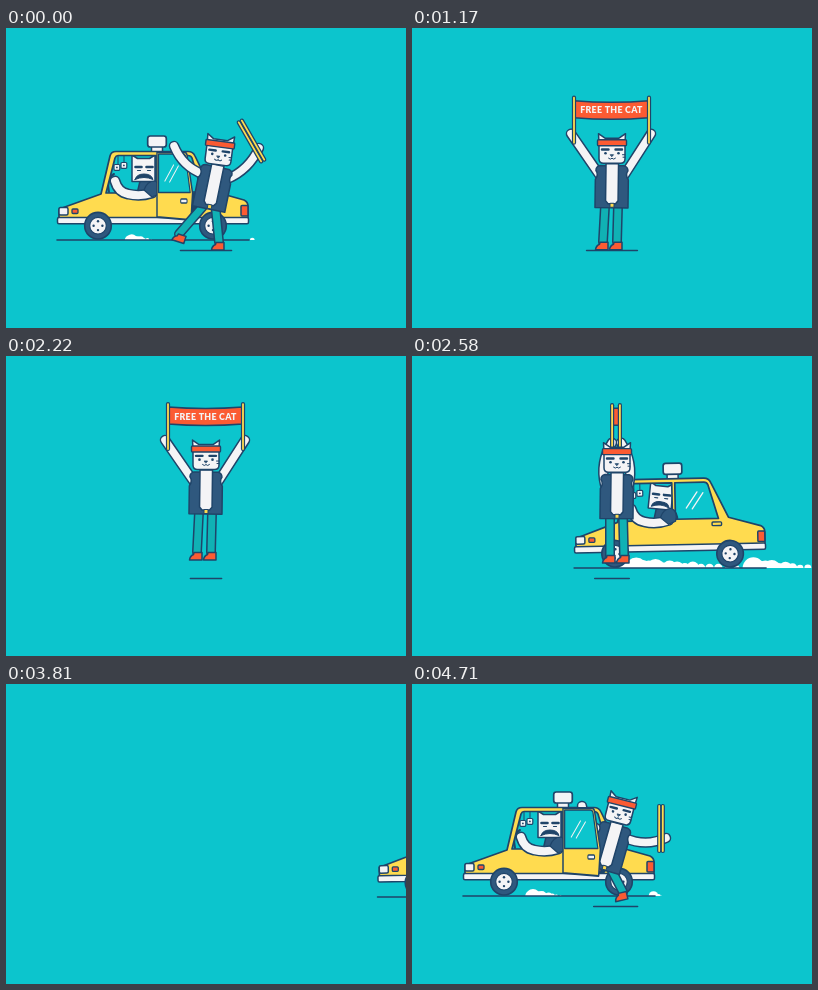
An HTML page with a canvas for the animation above (4770 ms loop, 400 px wide and 300 px high).

```html
<!DOCTYPE html>
<html lang="en">
<head>
<meta charset="utf-8">
<title>Free the cat</title>
<style>
html, body { margin: 0; height: 100%; overflow: hidden; background: #0cc5cd; }
canvas { display: block; width: 100vw; height: 100vh; }
</style>
</head>
<body>
<canvas id="stage"></canvas>
<script>
const LOOP = 4770, TEAL = '#0cc5cd', LINE = '#1f4469', VEST = '#2f587e', WHITE = '#f4f4f6',
  YELLOW = '#ffdb4f', ORANGE = '#fb5b33', PANTS = '#10b1b4';
const canvas = document.getElementById('stage'), g = canvas.getContext('2d');
const ratio = window.devicePixelRatio || 1;
canvas.width = 400 * ratio;
canvas.height = 300 * ratio;

const clamp = (v, lo = 0, hi = 1) => Math.max(lo, Math.min(hi, v));
const smooth = v => v * v * (3 - 2 * v);
const ramp = (t, a, b) => smooth(clamp((t - a) / (b - a)));
const mix = (a, b, k) => a + (b - a) * k;

function paint(path, fill, width = 1.5, rule = 'nonzero') {
  const p = typeof path === 'string' ? new Path2D(path) : path;
  if (fill) { g.fillStyle = fill; g.fill(p, rule); }
  if (width) { g.strokeStyle = LINE; g.lineWidth = width; g.stroke(p); }
}
function box(x, y, w, h, r, fill, width) {
  const p = new Path2D();
  p.roundRect(x, y, w, h, r);
  paint(p, fill, width);
}
function disc(x, y, r, fill, width = 0) {
  const p = new Path2D();
  p.arc(x, y, r, 0, 7);
  paint(p, fill, width);
}
function limb(path, width, color, edge = 3) {
  const p = new Path2D(path);
  for (const [w, c] of [[width + edge, LINE], [width, color]]) {
    g.lineWidth = w;
    g.strokeStyle = c;
    g.stroke(p);
  }
}
function within(x, y, angle, draw) {
  g.save();
  g.translate(x, y);
  g.rotate(angle);
  draw();
  g.restore();
}

// Value of a keyed track at time t; keys are [time, number or array]
function track(keys, t) {
  let i = 0;
  while (i < keys.length - 2 && t >= keys[i + 1][0]) i++;
  const [t0, a] = keys[i], [t1, b] = keys[i + 1], k = ramp(t, t0, t1);
  return Array.isArray(a) ? a.map((v, n) => mix(v, b[n], k)) : mix(a, b, k);
}

// Car
const arrive = (t, stop, rate) => ((stop - Math.min(t, stop)) * rate) ** 2;
const leave = (t, start) => -258 * (Math.max(0, t - start) / 450) ** 2;
function carOffset(t) {
  if (t < 570) return leave(t, 60);
  if (t < 2300) return null;
  if (t < 3290) return arrive(t, 2921, .031);
  if (t < 3780) return leave(t, 3290);
  return arrive(t, 4455, .0278);
}
const doorKeys = [[0, .79], [90, 1], [2800, 1], [2920, .55], [3070, .55], [3200, 1],
  [4420, 1], [4520, .55], [4610, .6], [4710, .83], [LOOP, .79]];

// Half-round puffs trailing each wheel, dying down after the stop
function dust(t, stop, rate) {
  const now = arrive(t, stop, rate);
  g.fillStyle = '#fff';
  for (const [wheel, life] of [[98, 540], [221, 350]]) {
    for (let k = 0; k < 30; k++) {
      const born = stop - 870 + k * 30, age = t - born;
      if (age < 0 || age > life) continue;
      const x = wheel + mix(now, arrive(born, stop, rate), .15) + .08 * age;
      const r = (10 + 2 * Math.sin(k * 2.4 + wheel)) * clamp(age / 40) * (1 - age / life) ** .7;
      g.beginPath();
      g.arc(x, 212, r, Math.PI, 2 * Math.PI);
      g.fill();
    }
  }
}

function glare(x) {
  g.strokeStyle = WHITE;
  g.lineWidth = 1.3;
  g.stroke(new Path2D(`M${x} 153l11-16M${x + 6} 154l11-16`));
}

function driver(t, off) {
  paint('M103 164Q100 150 108 146', null, 2);
  paint('M112 128V137M118 128V135', null, 1);
  box(108, 136.5, 5.8, 5.8, 1, WHITE, 1.2);
  box(115, 134.5, 5.8, 5.8, 1, WHITE, 1.2);
  disc(110.9, 139.4, .9, LINE);
  disc(117.9, 137.4, .9, LINE);
  paint('M131 166L134 153H147Q156 156 155 166Z', VEST);
  const tilt = .12 * clamp(off / 110) - .12 * ramp(t, 2900, 3000) * (1 - ramp(t, 3120, 3220));
  within(137.5, 152, tilt, () => {
    paint('M-11.5 1.5V-25L-6-21.5H6L11.5-25V1.5Z', WHITE);
    paint('M-8-13L-2-13M3-13L9-13', null, 2.6);
    paint('M-6-9.5H-3M4-9.5H7', null, 1.2);
    paint('M-8.5-.5Q-7-6 .5-6Q8-6 9.5-.5Q5-2.5 .5-2.5Q-4-2.5-8.5-.5Z', LINE, 1);
  });
}

function wheel(x, turn) {
  within(x, 197.7, turn, () => {
    disc(0, 0, 13.3, VEST, 1.6);
    disc(0, 0, 8.3, WHITE, 1.2);
    for (let a = 0; a < 4; a++) disc(4.4 * Math.cos(a * 1.571), 4.4 * Math.sin(a * 1.571), 1.2, LINE);
  });
}

function carBody(t, off, door) {
  driver(t, off);
  box(145.5, 118, 11, 6, 0, WHITE);
  box(141.7, 108, 18.6, 11, 2.5, WHITE, 1.7);
  paint('M53 191V181L56 180L95 166L104 128Q105 123.5 110 123.5H182Q187 123.5 189 128L206 163L238 172Q242 174 242 178V191Z' +
    'M100 165L109 130Q110 127.5 112 127.5H150V165ZM153 127.5H182Q185 127.5 186 130L196 164H153Z', YELLOW, 1.7, 'evenodd');
  if (door > .99) {
    glare(164);
    box(189.5, 167.5, 9.5, 3.6, 1, YELLOW, 1.4);
  } else {
    paint('M152 165H197L195 184L190 191H152Z', LINE);
  }
  limb('M146 165Q134 169 122 166Q112 164 109 153', 8, WHITE);
  paint('M138 162Q141 153 149 153Q156 156 153 166L146 169Z', VEST, 1.2);
  box(53, 179.5, 9, 7.5, 1.5, WHITE);
  box(66, 181, 6, 4.5, 1, ORANGE, 1.3);
  box(235, 177.5, 7, 10.5, 1, ORANGE);
  box(51.5, 189.5, 191, 6.3, 1.5, WHITE);
}

function car(t, off, door) {
  paint('M51 212H243', null, 1.6);
  const pitch = clamp(-off / 5600, -.02, .02);
  within(115, 195, pitch, () => {
    g.translate(-115, -195);
    carBody(t, off, door);
  });
  wheel(92, off / 14);
  wheel(207, off / 14);
}

function openDoor(s) {
  g.save();
  g.translate(151, 0);
  g.scale(s, 1);
  paint('M0 124H34Q37 124 38 127L45 165L43 192L0 189Z', YELLOW, 1.8);
  paint('M2 126H33Q35 126 36 128L42 164.5H2Z', TEAL);
  glare(10);
  box(30, 171, 8, 4, 1, WHITE, 1.3);
  g.restore();
}

// Cat poses: hip, neck, head turn, left hand, right hand, left foot, right foot, poles centre, pole angle, pole gap
const stride = [203, 179, 211, 140, .13, 168, 118, 253, 120, 173, 214, 213, 222, 245.5, 113, -.52, 1.8];
const cheer = [199.5, 178, 200, 139, 0, 159, 106, 239, 106, 191, 222, 205, 222, 199.5, 92.5, 0, 37.5];
const folded = [204.5, 179, 205, 138, 0, 200, 105, 209, 105, 198, 222, 212, 222, 204, 90, 0, 3.9];
const lowered = [205, 179, 205, 139, 0, 183, 168, 228, 165, 198, 222, 212, 222, 226, 150, .5, 1.8];
const boarding = [204, 178, 210, 138, 0, 190, 168, 179, 172, 186, 184, 217, 220, 220, 163, .75, 1.8];
const seated = [178, 184, 173, 162, 0, 165, 176, 182, 178, 172, 188, 182, 188, 180, 178, 1.55, 1.8];
const leaning = [192, 184, 204, 142, .25, 170, 122, 254, 154, 184, 188, 211, 216, 249, 144.5, 0, 1.8];
const poseKeys = [[0, stride], [260, folded], [560, folded], [760, cheer], [2340, cheer], [2520, folded],
  [2595, folded], [2700, lowered], [2840, lowered], [2990, boarding], [3070, boarding], [3200, seated],
  [4460, seated], [4690, leaning], [4715, leaning], [LOOP, stride]];

function hopHeight(t) {
  if (t < 270 || t > 2670) return 0;
  const u = (t - 270) % 300 / 300;
  return 72 * u * (1 - u);
}

function banner(x, y, angle, gap) {
  within(x, y, angle, () => {
    const sag = 3 * clamp(gap / 37);
    const cloth = new Path2D(`M${-gap}-19.5Q0 ${-19.5 + sag} ${gap}-19.5V-2.5Q0 ${-2.5 + sag} ${-gap}-2.5Z`);
    paint(cloth, ORANGE);
    g.save();
    g.clip(cloth);
    g.fillStyle = WHITE;
    g.font = '900 8.8px Lato, sans-serif';
    g.letterSpacing = '0.3px';
    g.textAlign = 'center';
    if (gap > 10) g.fillText('FREE THE CAT', 0, -6.8);
    g.restore();
    for (const px of [-gap, gap]) limb(`M${px}-22.5V22.5`, 1.8, YELLOW, 2.4);
  });
}

function arm(sx, sy, hx, hy, side) {
  const dx = hx - sx, dy = hy - sy, d = Math.hypot(dx, dy) || 1;
  const bend = side * Math.min(9, Math.sqrt(Math.max(0, 2300 - d * d)) * .5);
  const cx = (sx + hx) / 2 - dy / d * bend, cy = (sy + hy) / 2 + dx / d * bend;
  limb(`M${sx} ${sy}Q${cx} ${cy} ${hx} ${hy}`, 7.5, WHITE);
}

function leg(x, y, fx, fy) {
  limb(`M${x} ${y}L${fx} ${fy - 8}`, 7, PANTS);
  within(fx, fy, clamp((x - fx - 8) / 40) * .8 - clamp((fx - x - 5) / 30) * .9, () =>
    paint('M-7.5 0Q-7-4-3.5-5.5L-3-7.5H5V0Z', ORANGE));
}

function head() {
  paint('M-13-8L-13.5-17L-7-12.5H7L13.5-17L13-8V8Q13 12.5 8.5 12.5H-8.5Q-13 12.5-13 8Z', WHITE);
  box(-14.5, -11, 29, 6, 1, ORANGE, 1.4);
  paint('M-10-1.2H-3.5M3.5-1.2H10', null, 2.4);
  disc(-6.5, 2.6, 1.3, LINE);
  disc(6.5, 2.6, 1.3, LINE);
  paint('M-1.5 4H1.5L0 5.8Z', LINE, .8);
  paint('M-3.5 7.5Q-1.5 9.5 0 7.5Q1.5 9.5 3.5 7.5M10.5 4H13M11 6.5H13', null, 1);
}

function cat(t) {
  const hop = hopHeight(t), lift = hop * 1.22;
  let [hipX, hipY, neckX, neckY, turn, lx, ly, rx, ry, flx, fly, frx, fry, px, py, angle, gap] = track(poseKeys, t);
  hipY -= lift; neckY -= lift; ly -= lift; ry -= lift; py -= lift;
  fly -= hop; fry -= hop;
  const lean = Math.atan2(neckX - hipX, hipY - neckY), length = Math.hypot(hipX - neckX, hipY - neckY);
  const c = Math.cos(lean), s = Math.sin(lean);
  const shoulder = side => [neckX + side * 12 * c - 9 * s, neckY + side * 12 * s + 9 * c];
  const crossing = rx < hipX;

  arm(...shoulder(-1), lx, ly, -1);
  if (!crossing) arm(...shoulder(1), rx, ry, 1);
  banner(px, py, angle, gap);
  leg(hipX - 6.5, hipY, flx, fly);
  leg(hipX + 6.5, hipY, frx, fry);
  within(neckX, neckY, lean, () => {
    box(-5, -5, 10, 10, 0, WHITE);
    paint(`M-12-1H12Q16 0 16 4Q13 8 16.5 13V${length + 2}H-16.5V13Q-13 8-16 4Q-16 0-12-1Z`, VEST);
    paint(`M-6-3H6.5V${length - 5}L4 ${length - 2}H-3.5L-6 ${length - 5}Z`, WHITE);
    box(-1.5, length - 2.5, 4, 4, .5, YELLOW, 1);
  });
  if (crossing) arm(...shoulder(1), rx, ry, 1);
  within(neckX + 16 * Math.sin(turn), neckY - 16 * Math.cos(turn), turn, head);
}

function catShadow(t) {
  const out = 1 - ramp(t, 2930, 3130) + ramp(t, 4520, LOOP);
  const half = 25.5 * out - hopHeight(t) * .55, mid = 200 + (1 - out) * 26;
  if (half > .5) paint(`M${mid - half} 222.5H${mid + half}`, null, 1.6);
}

function draw(t) {
  g.setTransform(ratio, 0, 0, ratio, 0, 0);
  g.lineCap = g.lineJoin = 'round';
  g.fillStyle = TEAL;
  g.fillRect(0, 0, 400, 300);
  const off = carOffset(t), door = track(doorKeys, t);
  const inside = t > 3130 && t < 4540, behindDoor = t > 2990 && t < 4740;
  const showDoor = () => { if (off !== null && door <= .99) within(off, 0, 0, () => openDoor(door)); };
  dust(t, 2921, .031);
  dust(t < 1200 ? t + LOOP : t, 4455, .0278);
  catShadow(t);
  if (off !== null) {
    within(off, t > 3780 ? clamp(off / 320) : 0, 0, () => {
      if (inside) cat(t);
      car(t, off, door);
    });
  }
  if (!behindDoor) showDoor();
  if (!inside) cat(t);
  if (behindDoor) showDoor();
}

const start = performance.now();
function tick() {
  draw((performance.now() - start) % LOOP);
  requestAnimationFrame(tick);
}
tick();
</script>
</body>
</html>
```
